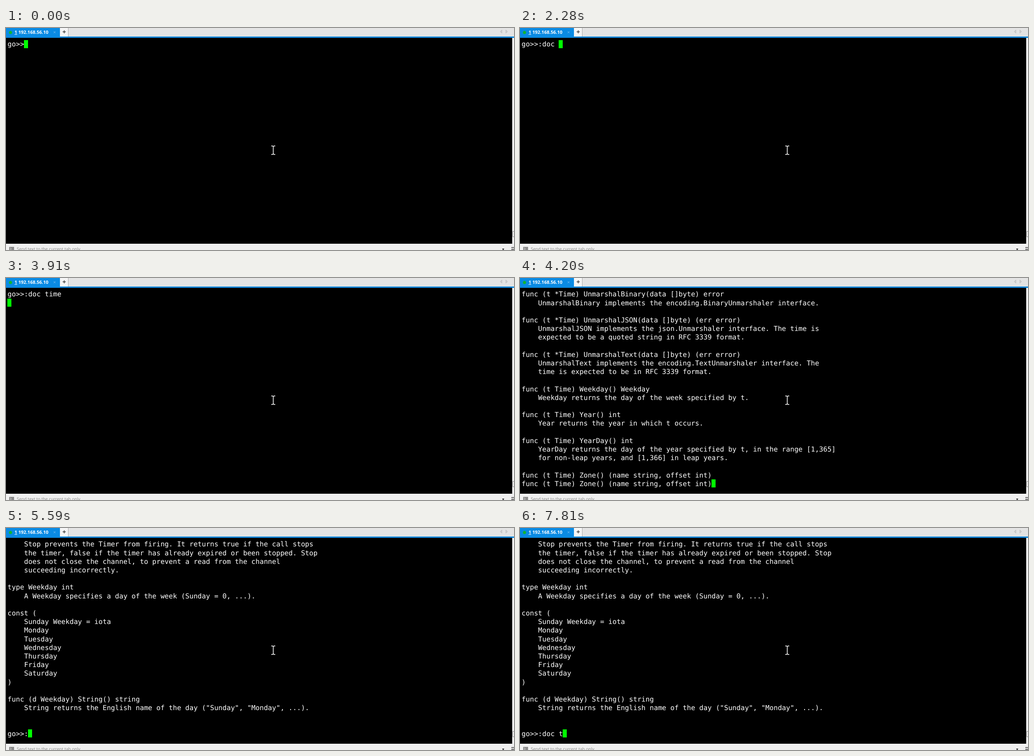
These frames come from a looping animation (1130x495 px, 8000 ms). An HTML page:

```html
<!DOCTYPE html>
<html lang="en">
<head>
<meta charset="utf-8">
<title>Terminal session</title>
<style>
  html, body { margin: 0; width: 100%; height: 100%; overflow: hidden; background: #000; }
  svg { display: block; }
  text { white-space: pre; text-rendering: geometricPrecision; }
  #screen { font: 15.28px "DejaVu Sans Mono", monospace; fill: #fff; }
  .ui { font-family: "Open Sans", "Noto Sans", sans-serif; }
</style>
</head>
<body>
<svg width="1130" height="495" viewBox="0 0 1130 495">
  <rect width="1130" height="495"/>

  <!-- tab bar -->
  <rect width="1130" height="19" fill="#e4e4e4"/>
  <rect y="19" width="1130" height="3" fill="#0a84d8"/>
  <rect width="120" height="20" fill="#0a8be4"/>
  <circle cx="10" cy="10" r="3.5" fill="#12b431"/>
  <text class="ui" x="19" y="13" font-size="10.2" font-weight="700" fill="#fff"><tspan text-decoration="underline">1</tspan> 192.168.56.10</text>
  <path d="M106 7.5l4 4m0-4l-4 4" stroke="#7cc0f0"/>
  <rect x="120" width="18" height="19" fill="#f6f6f6"/>
  <path d="M138.5 0V19" stroke="#a8a8a8"/>
  <path d="M126 8.5h7M129.5 5v7" stroke="#333" stroke-width="1.3"/>
  <path d="M1103 4.5v7l-3.5-3.5zM1112 4.5v7l3.5-3.5z" fill="#d6d6d6" stroke="#b8b8b8"/>

  <!-- scroll bar -->
  <rect x="1126" y="22" width="4" height="459" fill="#f0f0f0"/>
  <rect x="1127.5" y="453.5" width="8" height="12" fill="#fff" stroke="#888"/>

  <!-- send bar -->
  <rect y="481" width="1130" height="14" fill="#f0f0f0"/>
  <rect x="7" y="488" width="11" height="7" fill="#8c8c8c"/>
  <path d="M9 490l3 2.5-3 2.5" fill="none" stroke="#e8e8e8"/>
  <text class="ui" x="24" y="496" font-size="9.4" fill="#868686">Send text to the current tab only</text>
  <path d="M1103.5 492h5l-2.5 3z"/>
  <path d="M1124 489.5h6M1124 493.5h6" stroke="#333" stroke-width="1.5"/>

  <g id="screen"></g>
  <rect id="cursor" width="9" height="18" fill="#0f0"/>

  <!-- mouse pointer -->
  <path d="M590 263h3l1.5 1.5 1.5-1.5h3M594.5 264v17M590 282h3l1.5-1.5 1.5 1.5h3" fill="none" stroke="#fff" stroke-width="1.6"/>
</svg>
<script>
const LOOP = 8000, LEFT = 3.6, TOP = 27, CELL = 9.2, ROW = 19.2, BASELINE = 14.3;
const PROMPT = 'go>>', COMMAND = ':doc time';
const firstKeys = [120, 710, 850, 1130, 2280, 2710, 2990, 3240, 3380];
const secondKeys = [5590, 6150, 6420, 6700, 7400, 7810];
const ENTER = 3910, SCROLL = 4200, DONE = 4320;

const timeDoc = `func (t *Time) UnmarshalBinary(data []byte) error
    UnmarshalBinary implements the encoding.BinaryUnmarshaler interface.

func (t *Time) UnmarshalJSON(data []byte) (err error)
    UnmarshalJSON implements the json.Unmarshaler interface. The time is
    expected to be a quoted string in RFC 3339 format.

func (t *Time) UnmarshalText(data []byte) (err error)
    UnmarshalText implements the encoding.TextUnmarshaler interface. The
    time is expected to be in RFC 3339 format.

func (t Time) Weekday() Weekday
    Weekday returns the day of the week specified by t.

func (t Time) Year() int
    Year returns the year in which t occurs.

func (t Time) YearDay() int
    YearDay returns the day of the year specified by t, in the range [1,365]
    for non-leap years, and [1,366] in leap years.

func (t Time) Zone() (name string, offset int)
func (t Time) Zone() (name string, offset int)`;

const weekdayDoc = `    Stop prevents the Timer from firing. It returns true if the call stops
    the timer, false if the timer has already expired or been stopped. Stop
    does not close the channel, to prevent a read from the channel
    succeeding incorrectly.

type Weekday int
    A Weekday specifies a day of the week (Sunday = 0, ...).

const (
    Sunday Weekday = iota
    Monday
    Tuesday
    Wednesday
    Thursday
    Friday
    Saturday
)

func (d Weekday) String() string
    String returns the English name of the day ("Sunday", "Monday", ...).


`;

const screen = document.getElementById('screen');
const cursor = document.getElementById('cursor');
let shown = null;

const typed = (keys, t) => PROMPT + COMMAND.slice(0, keys.filter(k => k <= t).length);

function contentAt(t) {
  if (t < ENTER) return typed(firstKeys, t);
  if (t < SCROLL) return PROMPT + COMMAND + '\n';
  if (t < DONE) return timeDoc;
  return weekdayDoc + typed(secondKeys, t);
}

function show(content) {
  if (content === shown) return;
  shown = content;
  const lines = content.split('\n');
  screen.replaceChildren(...lines.map((line, row) => {
    const text = document.createElementNS('http://www.w3.org/2000/svg', 'text');
    text.setAttribute('x', LEFT);
    text.setAttribute('y', TOP + row * ROW + BASELINE);
    text.textContent = line;
    return text;
  }));
  // The cursor always follows the last character.
  const row = lines.length - 1;
  cursor.setAttribute('x', Math.floor(LEFT + lines[row].length * CELL + 0.01));
  cursor.setAttribute('y', Math.round(TOP + row * ROW));
}

const start = performance.now();
function tick() {
  show(contentAt((performance.now() - start) % LOOP));
  requestAnimationFrame(tick);
}
tick();
</script>
</body>
</html>
```
